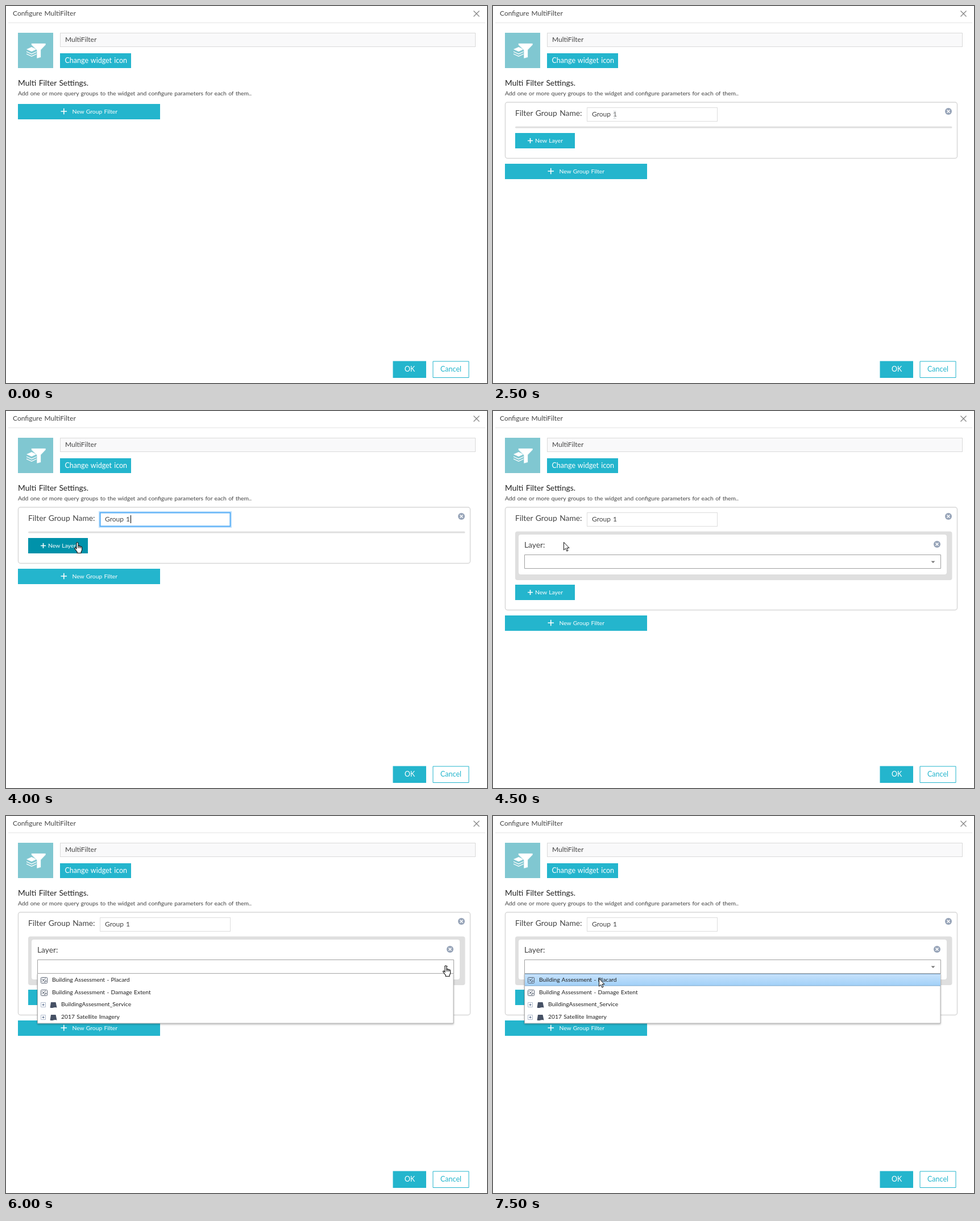
Write an HTML page that moves like this. It is 846x662 px and loops after 8 s.

```html
<!DOCTYPE html>
<html lang="en">
<head>
<meta charset="utf-8">
<title>Configure MultiFilter</title>
<style>
  html, body { margin: 0; width: 100%; height: 100%; overflow: hidden; background: #fff; }
  svg { display: block; width: 846px; height: 662px; }
  text { font: 10.3px Lato, "Open Sans", sans-serif; word-spacing: .07em; fill: #444; }
  .t12 { font-size: 12px; }
  .t14 { font-size: 13.8px; }
  .dark { fill: #222; }
  .white { fill: #fff; }
  .btn { fill: #24b5cd; }
  .hot { fill: #0092aa; }
  .box { fill: #fff; stroke: #ddd; }
  .plus { stroke: #fff; stroke-width: 1.6; }
  .focus { fill: none; stroke: #45a5f5; display: none; }
  .on .focus { display: inline; }
  .big { font-size: 12.5px; }
</style>
</head>
<body>
<svg viewBox="0 0 846 662">
  <defs>
    <linearGradient id="blue" x2="0" y2="1">
      <stop stop-color="#c8e3fc"/><stop offset="1" stop-color="#a1d0f8"/>
    </linearGradient>
    <filter id="shadow" x="-5%" y="-10%" width="110%" height="130%">
      <feDropShadow dx="0" dy="1.5" stdDeviation="1.5" flood-opacity=".28"/>
    </filter>
    <g id="remove">
      <circle r="6" fill="#97a4b8"/>
      <path d="M-2.5-2.5l5 5m0-5l-5 5" stroke="#fff" stroke-width="1.5"/>
    </g>
    <g id="table" fill="none" stroke="#566070">
      <rect x=".5" y=".5" width="11" height="10" rx="1"/>
      <path d="M2 3l3 2 4-3M2 8l3-3 2 4 3-3M8 5l2 3"/>
    </g>
    <g id="folder">
      <path d="M.5.5h8v8h-8z" fill="#fff" stroke="#b4bfd0"/>
      <path d="M2.5 4.5h4m-2-2v4" stroke="#566b8c"/>
      <path d="M18 0h8.5l2 9.5q-3-1-6 0t-6 0z" fill="#465165"/>
    </g>
    <path id="arrow" d="M.5.5v13.6l3.2-2.9 2.1 4.9 2.2-1-2.1-4.7h4.1z" fill="#fff" stroke="#111"/>
    <g id="hand">
      <path d="M4 12V2.2a1.5 1.5 0 0 1 3 0V7q1.4-1 2.3.5 1.6-.8 2.2.7 2-.6 2.1 1.2v4.1q0 2-1.5 3.7v2.3H5.2v-2L.8 11.8q-.6-1.9 1.2-1.8z" fill="#fff" stroke="#111" stroke-width="1.1"/>
      <path d="M7 7v4m2.3-3.5V11m2.2-2.8V11" stroke="#111" fill="none"/>
    </g>
    <path id="beam" d="M-2.5-6.5h2l.5 1 .5-1h2M0-6V6m-2.5.5h2l.5-1 .5 1h2" fill="none" stroke="#d4d8db"/>
  </defs>

  <text class="t12" x="12" y="17">Configure MultiFilter</text>
  <path d="M822.5 8.5l10 10m0-10l-10 10" stroke="#858585" stroke-width="1.3"/>
  <path d="M4 29.5h839" stroke="#e4e4e4"/>

  <path d="M21 47h62v62H21z" fill="#80c7d1"/>
  <g fill="#fff">
    <path d="M45 72l9 4-9 4-9-4z"/>
    <path d="M36 79.5l9 4 9-4v1.3l-9 4.2-9-4.2zM36 83.5l9 4 9-4v1.3l-9 4.2-9-4.2z"/>
    <path d="M44.5 65.5H70v2.7L61.5 77v13.3l-7.5 2V77.5l-9.5-9.3z" stroke="#80c7d1" stroke-width=".7"/>
  </g>
  <rect x="95.5" y="47.5" width="730" height="24" fill="#f9f9fa" stroke="#dadada"/>
  <text class="t12" x="104" y="63">MultiFilter</text>
  <path class="btn" d="M95 83h125v26H95z"/>
  <text class="white big" x="103.5" y="100">Change widget icon</text>

  <text class="t14 dark" x="21" y="140">Multi Filter Settings.</text>
  <text x="21" y="157">Add one or more query groups to the widget and configure parameters for each of them..</text>

  <g id="group">
    <rect id="frame" class="box" x="21.5" y="169" width="795" rx="4" style="stroke:#d8d8d8;stroke-width:1.5"/>
    <text class="t14" x="39" y="193">Filter Group Name:</text>
    <rect class="box" x="165.5" y="178.5" width="229" height="24"/>
    <g class="focus">
      <rect x="165" y="178" width="230" height="25" stroke-width="4" stroke-opacity=".35"/>
      <rect x="165.5" y="178.5" width="229" height="24" stroke-width="1.4"/>
      <path d="M219.5 183v14" stroke="#000"/>
    </g>
    <text class="t12" x="174" y="194">Group 1</text>
    <use href="#remove" x="801" y="185"/>
    <rect id="tray" x="39" y="211.5" width="768.5" fill="#dfdfdf"/>
    <g id="layer">
      <rect x="45" y="217" width="753" height="70" rx="4" fill="#fff"/>
      <text class="t14" x="55" y="240">Layer:</text>
      <use href="#remove" x="781" y="234"/>
      <path d="M55.5 252.5h732v24h-732z" fill="#fff" stroke="#a0a0a0"/>
      <path d="M770.5 263.5h7l-3.5 3.5z" fill="#777"/>
    </g>
    <g id="addLayer">
      <path id="layerBtn" class="btn" d="M39 0h105v27H39z"/>
      <path class="plus" d="M61 13.5h9m-4.5-4.5v9"/>
      <text class="white" x="74" y="17">New Layer</text>
    </g>
  </g>

  <g id="addGroup">
    <path id="groupBtn" class="btn" d="M21 0h250v27H21z"/>
    <path class="plus" d="M96.5 13h10.5m-5.25-5.25v10.5"/>
    <text class="white" x="116.5" y="17">New Group Filter</text>
  </g>

  <g id="menu">
    <path d="M55.5 276.5h731.5v87.5h-731.5z" fill="#fff" stroke="#aaa" filter="url(#shadow)"/>
    <g id="hover">
      <path d="M56 277h731v21H56z" fill="url(#blue)"/>
      <path d="M56 277.5h731M56 298h731" stroke="#7da5c8"/>
    </g>
    <use href="#table" x="61" y="283"/>
    <text class="dark" x="81" y="291">Building Assessment - Placard</text>
    <use href="#table" x="61" y="305"/>
    <text class="dark" x="81" y="313">Building Assessment - Damage Extent</text>
    <use href="#folder" x="61" y="327"/>
    <text class="dark" x="97" y="334">BuildingAssesment_Service</text>
    <use href="#folder" x="61" y="349"/>
    <text class="dark" x="97" y="356">2017 Satellite Imagery</text>
  </g>

  <path class="btn" d="M680.5 623.5h58.5v29.5h-58.5z"/>
  <text class="white big" x="701" y="642">OK</text>
  <path d="M751 624h63v28.5h-63z" fill="#fff" stroke="#24b5cd"/>
  <text class="big" x="764" y="642" style="fill:#24b5cd">Cancel</text>
  <use id="cursor"/>
</svg>
<script>
  const $ = id => document.getElementById(id);
  const STEP = 500, LOOP = 8000;

  // Pointer shape and place for each half second
  const pointer = [
    null, ["arrow", 718, 226], ["arrow", 511, 230], ["arrow", 324, 223],
    ["hand", 208, 189], ["beam", 214, 191], ["beam", 237, 191], ["arrow", 176, 213],
    ["hand", 120, 230], ["arrow", 124, 230], ["arrow", 470, 249], ["hand", 768, 262],
    ["hand", 768, 262], ["arrow", 610, 285], ["arrow", 350, 285], ["arrow", 186, 285]
  ];

  const show = (id, on) => $(id).style.display = on ? "" : "none";
  const set = (id, name, value) => $(id).setAttribute(name, value);
  const moveY = (id, y) => set(id, "transform", `translate(0 ${y})`);

  function draw(step) {
    const hasGroup = step >= 5, hasLayer = step >= 9;
    show("group", hasGroup);
    show("layer", hasLayer);
    show("menu", step >= 12);
    show("hover", step >= 13);
    $("group").classList.toggle("on", step >= 6 && step <= 8);
    set("frame", "height", hasLayer ? 180.5 : 98.5);
    set("tray", "height", hasLayer ? 85.5 : 3);
    set("tray", "rx", hasLayer ? 4 : 1.5);
    moveY("addLayer", hasLayer ? 305 : 223);
    moveY("addGroup", hasLayer ? 359 : hasGroup ? 277 : 172);
    $("groupBtn").classList.toggle("hot", step === 4);
    $("layerBtn").classList.toggle("hot", step === 8);

    const p = pointer[step];
    show("cursor", p);
    if (p) {
      set("cursor", "href", "#" + p[0]);
      set("cursor", "x", p[1]);
      set("cursor", "y", p[2]);
    }
  }

  let last = -1;
  function tick() {
    const step = Math.floor(performance.now() % LOOP / STEP);
    if (step !== last) draw(last = step);
    requestAnimationFrame(tick);
  }
  tick();
</script>
</body>
</html>
```
